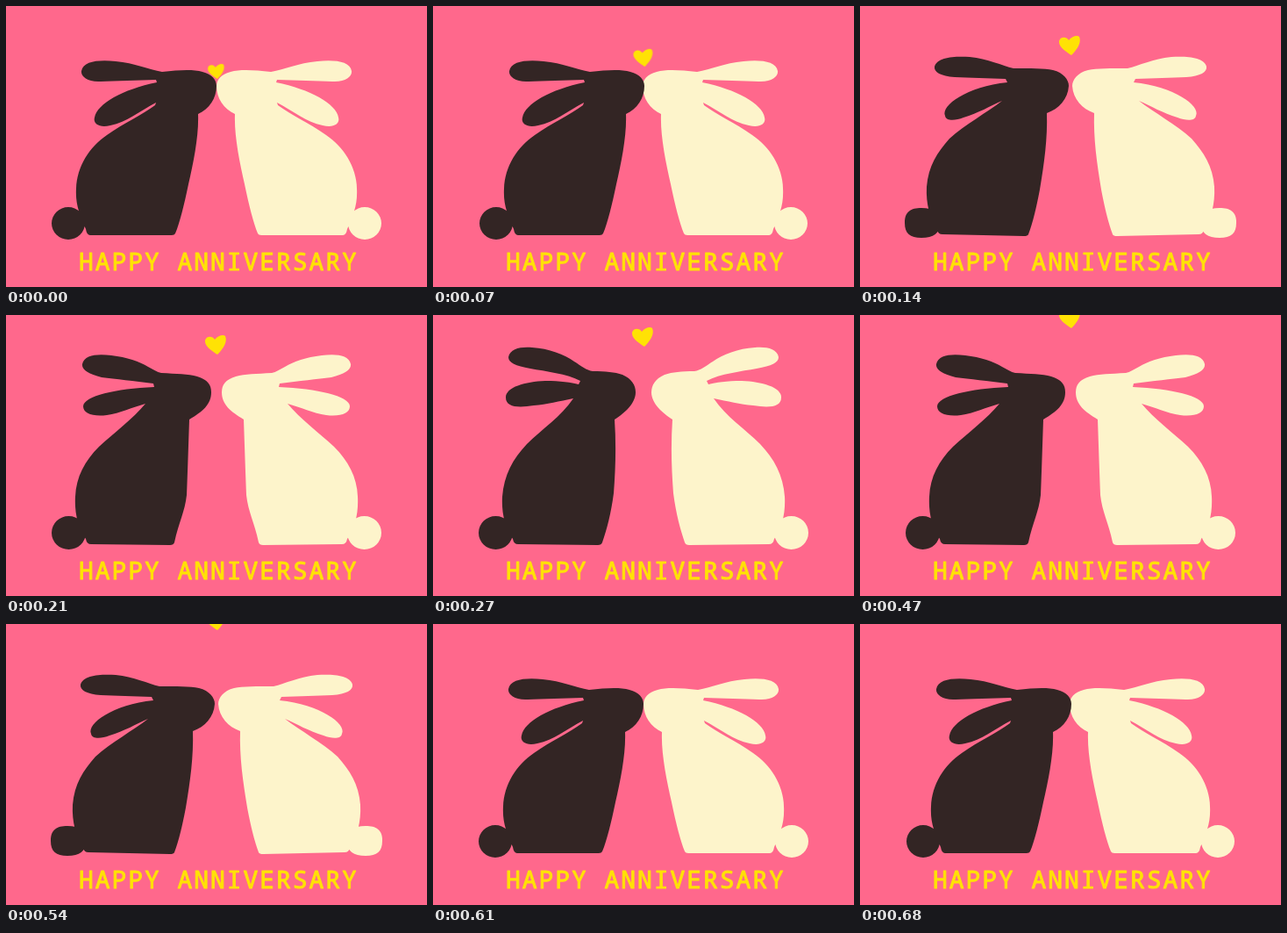
Write an HTML page without scripts that moves like this. It is 480 by 320 pixels and loops after 0.75 s.

```html
<!DOCTYPE html>
<html lang="en">
<head>
<meta charset="utf-8">
<title>Happy Anniversary</title>
<style>
  html, body { margin: 0; width: 100%; height: 100%; overflow: hidden; background: #ff688c; }
  svg { display: block; width: 100vw; height: 100vh; }

  :root {
    --kiss: path("M96 261Q92 261 91 254C84 238 79 226 80 208C81 182 95 161 115 147C135 133 155 124 170 113L171 110C152 120 138 132 119 136C106 139 99 134 101 127C104 111 133 95 172 87L171 84C150 85 125 85 108 86C93 87 85 80 86 74C88 63 105 61 125 63C147 65 162 72 178 75C197 73 213 72 224 75C235 78 240 84 240 91C240 105 232 117 219 123C220 147 214 177 208 203C203 227 198 247 193 259Q192 261 189 261ZM52 247.5a19 18.5 0 1 1 38 0a19 18.5 0 1 1 -38 0Z");
    --near: path("M94 260Q89 260 88 255C80 242 75 226 76 206C78 182 88 167 102 151C120 135 145 121 162 108C148 114 135 122 118 127C108 131 98 131 97 125C92 113 122 92 168 87L166 83C146 82 125 82 108 81C92 80 84 75 85 69C88 58 108 57 125 58C146 60 162 68 175 71C194 71 210 71 220 73C232 76 238 84 238 91C237 106 227 117 213 122C214 150 210 180 205 209C201 230 197 247 192 260Q191 262 187 262ZM51 247C51 234 58 230 70 230C84 230 91 236 91 247C91 259 84 264 70 264C57 264 51 259 51 247Z");
    --rise: path("M97 261Q92 261 91 255C82 242 78 226 79 207C80 184 90 166 106 150C122 135 145 118 159 101C144 105 130 112 115 114C99 116 88 112 88 104C89 92 125 84 169 82L168 78C146 75 125 73 109 71C94 67 86 62 87 56C89 45 105 44 120 46C138 48 152 53 162 59C168 62 172 65 177 66C194 67 208 67 218 70C230 74 234 79 234 88C234 102 224 110 209 119C208 148 207 180 206 205C204 224 197 236 192 259Q191 262 187 262ZM52 248a19.5 19 0 1 1 39 0a19.5 19 0 1 1 -39 0Z");
    --tall: path("M97 261Q92 261 91 255C82 242 78 226 79 207C81 182 91 164 107 147C124 130 146 116 160 95C144 98 130 102 115 103C97 106 83 105 83 94C83 82 105 76 128 75C145 75 158 77 166 79L168 75C153 67 128 64 111 61C94 58 86 54 86 48C88 38 100 36 113 37C132 38 150 45 161 53C169 58 175 63 182 64C197 64 207 65 216 68C227 73 231 80 231 88C231 101 218 112 207 119C209 148 208 178 206 203C203 226 198 245 193 259Q192 262 188 262ZM52 248a19.5 19 0 1 1 39 0a19.5 19 0 1 1 -39 0Z");
  }

  .rabbit { animation: lean .75s step-end infinite; }
  .heart  { animation: float .75s step-end infinite; }

  @keyframes lean {
    0%, 81.33%, 100% { d: var(--kiss); transform: none; }
    9.33%, 90.66%    { d: var(--kiss); transform: translate(1px, 0); }
    18.66%, 72%      { d: var(--near); transform: none; }
    28%, 62.66%      { d: var(--rise); transform: none; }
    36%              { d: var(--tall); transform: none; }
  }

  @keyframes float {
    0%           { transform: translate(239.5px, 74.5px) scale(.78); }
    9.33%        { transform: translate(239.5px, 59px) scale(.92); }
    18.66%       { transform: translate(239px, 45px); }
    28%          { transform: translate(239px, 34px); }
    36%          { transform: translate(239px, 25px); }
    45.33%       { transform: translate(239px, 18px); }
    53.33%       { transform: translate(239px, 12px); }
    62.66%       { transform: translate(239px, 4px); }
    72%          { transform: translate(239px, -4px); }
    81.33%, 100% { transform: translate(239px, -30px); }
  }

  .heart, text { fill: #ffe205; }
  text {
    font: 28px "Noto Sans Mono", "DejaVu Sans Mono", monospace;
    letter-spacing: 1.95px;
    stroke: #ffe205;
    stroke-linejoin: round;
  }
</style>
</head>
<body>
<svg viewBox="0 0 480 320">
  <rect width="480" height="320" fill="#ff688c"/>
  <g transform="matrix(-1 0 0 1 480 0)"><path class="rabbit" fill="#fdf4cb"/></g>
  <path class="rabbit" fill="#332524"/>
  <path class="heart" d="M-1-6C3-11 9-12 11-10C14-3 8 5 2 11C-2 8-13 2-12-5C-11-10-4-11-1-6Z"/>
  <text x="83.1" y="301">HAPPY ANNIVERSARY</text>
</svg>
</body>
</html>
```
